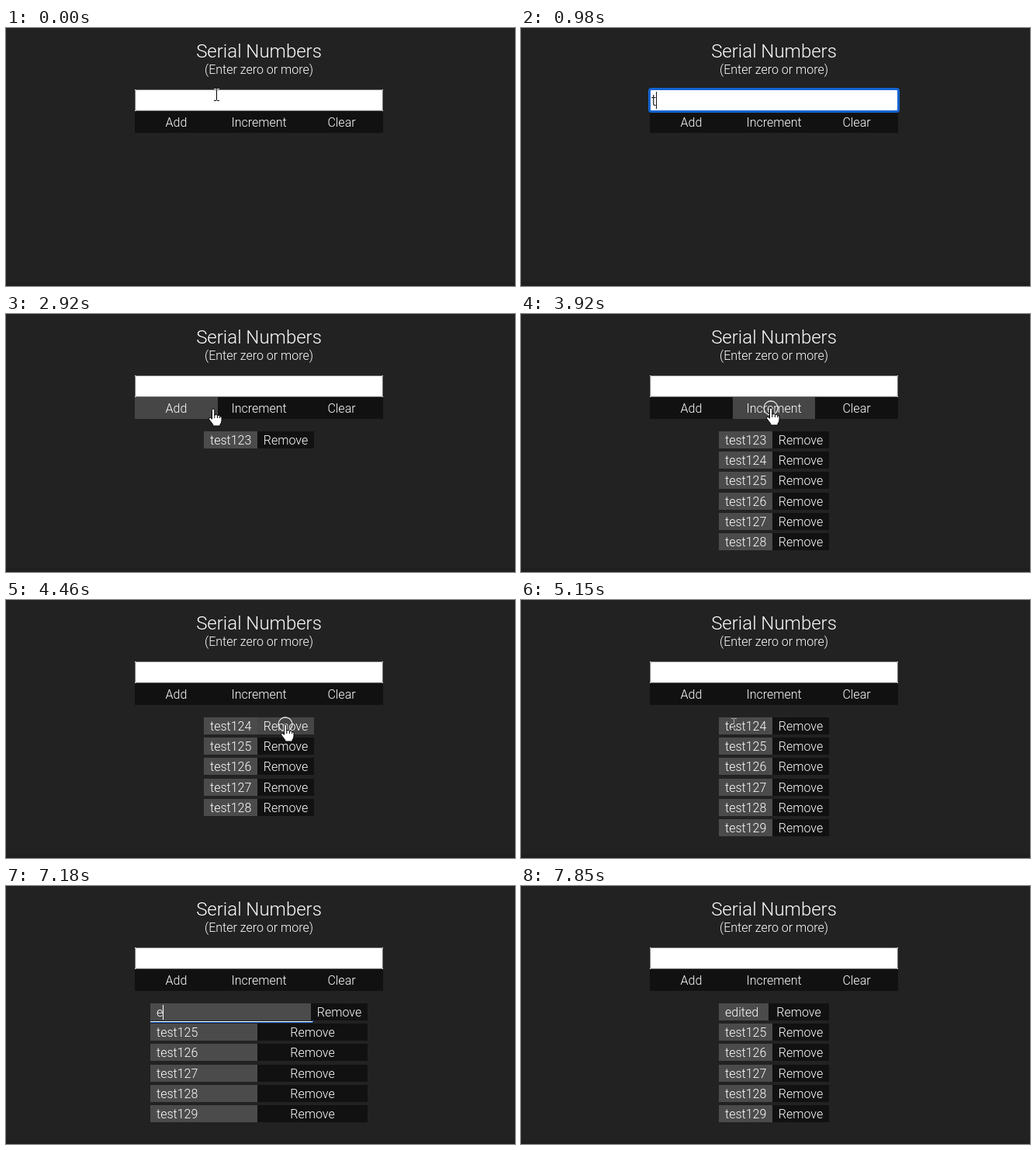
These frames come from a looping animation (656x332 px, 8 s). An HTML page with a canvas:

```html
<!DOCTYPE html>
<html lang="en">
<head>
<meta charset="utf-8">
<title>Serial Numbers</title>
<style>
  html, body { margin: 0; height: 100%; overflow: hidden; background: #222; }
  canvas { display: block; }
</style>
</head>
<body>
<canvas id="stage" width="656" height="332"></canvas>
<script>
const ctx = document.getElementById('stage').getContext('2d');
const LOOP = 8000;
const DARK = '#111', LIGHT = '#4b4b4b', HOVER = '#464646', INK = '#fff';

// Each step keeps the previous state and changes only what it names.
const steps = [
  [0, { at: [271, 86], text: '', focus: false, caret: false, first: 123, count: 0, edit: null, press: false }],
  [280, { focus: true, caret: true }],
  [860, { text: 't', at: null }],
  [1000, { text: 'te' }],
  [1140, { text: 'tes' }],
  [1280, { text: 'test' }],
  [1580, { text: 'test123' }],
  [1870, { caret: false }],
  [2190, { at: [269, 88] }],
  [2340, { at: [268, 98] }],
  [2480, { at: [267, 114] }],
  [2620, { at: [267, 122], press: true, focus: false }],
  [2770, { press: false, text: '', count: 1 }],
  [3040, { at: [268, 122] }],
  [3160, { at: [271, 122] }],
  [3330, { at: [315, 121], press: true }],
  [3470, { at: [322, 121], count: 2 }],
  [3620, { count: 3 }],
  [3770, { count: 5 }],
  [3920, { count: 6 }],
  [4070, { at: [325, 125], press: false }],
  [4190, { at: [344, 143] }],
  [4310, { at: [360, 160] }],
  [4460, { press: true, first: 124, count: 5 }],
  [4600, { at: [345, 128], press: false }],
  [4740, { at: [335, 122], press: true, count: 6 }],
  [4880, { at: [312, 125], press: false }],
  [5020, { at: [286, 143] }],
  [5150, { at: [274, 160] }],
  [5300, { at: [276, 162] }],
  [5430, { at: [280, 164] }],
  [5580, { at: [283, 165], edit: 'test124', caret: true }],
  [5720, { at: [284, 166] }],
  [5860, { at: [285, 166] }],
  [6460, { caret: false }],
  [7030, { edit: '', caret: true, at: null }],
  [7170, { edit: 'e' }],
  [7310, { edit: 'ed' }],
  [7440, { edit: 'edit' }],
  [7580, { edit: 'edite' }],
  [7720, { edit: 'edited' }],
  [7850, { edit: null, renamed: true }]
];

function stateAt(time) {
  const state = {};
  for (const [start, change] of steps) if (start <= time) Object.assign(state, change);
  return state;
}

function box(x, y, w, h, color) {
  ctx.fillStyle = color;
  ctx.fillRect(x, y, w, h);
}

function label(text, x, y, size = 16, align = 'left', color = INK) {
  ctx.font = `300 ${size}px Roboto, sans-serif`;
  ctx.textAlign = align;
  ctx.fillStyle = color;
  ctx.fillText(text, x, y);
  return ctx.measureText(text).width;
}

function button(text, x, y, w, h, at) {
  const over = at && at[0] >= x && at[0] < x + w && at[1] >= y && at[1] < y + h;
  box(x, y, w, h, over ? HOVER : DARK);
  label(text, x + w / 2, y + h / 2 + 6, 16, 'center');
  return over;
}

function outline(x, y, w, h, radius, color, width) {
  ctx.beginPath();
  ctx.roundRect(x, y, w, h, radius);
  ctx.strokeStyle = color;
  ctx.lineWidth = width;
  ctx.stroke();
}

function drawInput({ text, focus, caret }) {
  box(166, 79, 320, 28, '#fff');
  if (focus) outline(165.5, 78.5, 321, 29, 2.5, '#1464d2', 3);
  else outline(166.5, 79.5, 319, 27, 1.5, '#767676', 1);
  const width = label(text, 168, 100, 20, 'left', '#111');
  if (focus && caret) box(Math.round(168 + width), 82, 1, 22, '#111');
}

function drawRows({ first, count, edit, renamed, caret, at }) {
  const editing = edit !== null;
  const left = editing ? 186 : 255, right = editing ? 466 : 397;
  let over = false;
  for (let i = 0; i < count; i++) {
    const y = Math.round(151 + 26.2 * i);
    const active = editing && i === 0;
    const split = active ? 393 : renamed && i === 0 ? 319 : 324;
    const text = active ? edit : renamed && i === 0 ? 'edited' : 'test' + (first + i);
    box(left, y, split - left, 22, LIGHT);
    const width = label(text, left + 8, y + 17);
    over = button('Remove', split, y, right - split, 22, at) || over;
    if (active) {
      box(left, 174, 209, 1, '#fff');
      box(left, 175, 209, 1, '#1464d2');
      box(395, 173, 1, 2, '#1464d2');
      if (caret) box(Math.round(left + 8 + width), 153, 1, 19, '#fff');
    }
  }
  return over;
}

const hand = new Path2D('M-1.5 1.5Q-1.5 0 0 0Q1.8 0 1.8 1.7V8Q4.6 6.6 5.4 8.6Q8 7.6 8.6 9.6Q11 9 11 11.4V15Q11 18 9 20V22H-.2V20.4L-5.4 13.4Q-6 11 -3.6 11.4L-1.5 13.2Z');
const fingers = new Path2D('M1.8 7.5V12M5.4 8.6V12M8.6 9.6V12');

function drawCursor([x, y], overButton, press) {
  ctx.save();
  ctx.translate(x, y);
  if (press) {
    ctx.beginPath();
    ctx.arc(0, 0, 9, 0, 2 * Math.PI);
    ctx.strokeStyle = '#e8e8e8';
    ctx.lineWidth = 1.3;
    ctx.stroke();
  }
  if (overButton) {
    ctx.fillStyle = '#fff';
    ctx.strokeStyle = '#000';
    ctx.lineWidth = 1;
    ctx.fill(hand);
    ctx.stroke(hand);
    ctx.stroke(fingers);
  } else {
    ctx.globalCompositeOperation = 'difference';
    box(0, -7, 1, 14, '#fff');
    for (const edge of [-8, 7]) {
      box(-3, edge, 3, 1, '#fff');
      box(1, edge, 3, 1, '#fff');
    }
  }
  ctx.restore();
}

function draw(time) {
  const state = stateAt(time);
  box(0, 0, 656, 332, '#222');
  box(0, 327, 656, 5, '#1f1f1f');
  label('Serial Numbers', 326, 38, 24, 'center');
  label('(Enter zero or more)', 326, 59, 16, 'center');

  let over = false;
  ['Add', 'Increment', 'Clear'].forEach((name, i) => {
    const x = Math.round(166 + i * 320 / 3), end = Math.round(166 + (i + 1) * 320 / 3);
    over = button(name, x, 107, end - x, 28, state.at) || over;
  });
  drawInput(state);
  over = drawRows(state) || over;
  if (state.at) drawCursor(state.at, over, state.press);
}

function tick() {
  draw(performance.now() % LOOP);
  requestAnimationFrame(tick);
}
tick();
</script>
</body>
</html>
```
